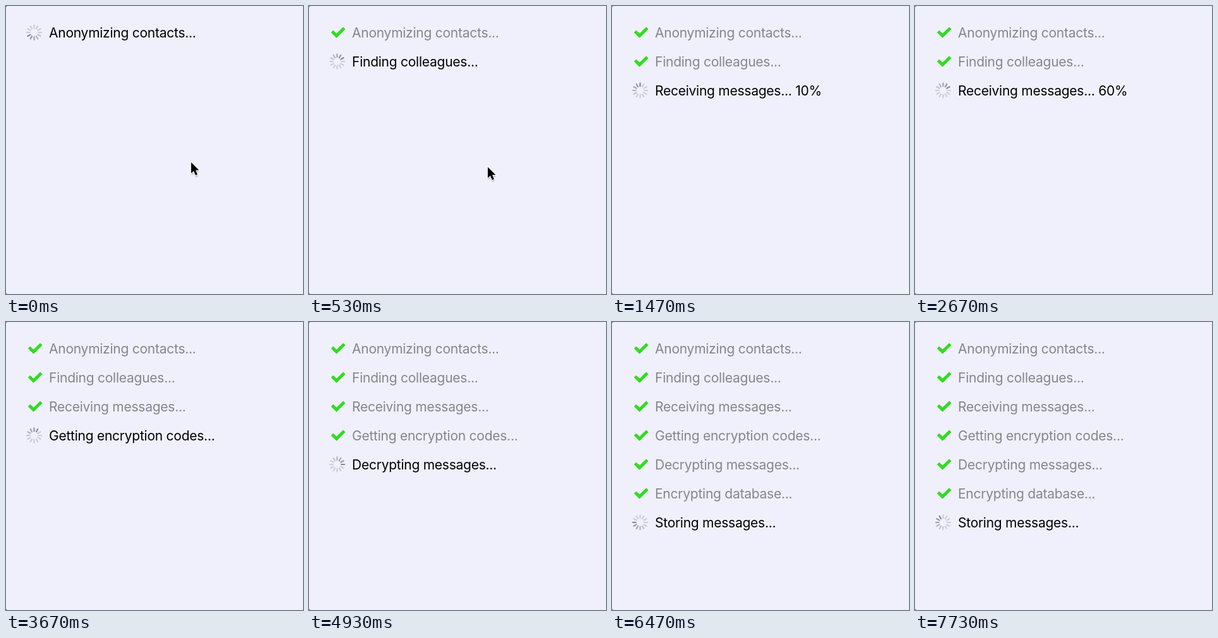
An HTML page that plays this animation: 470 by 457 pixels, repeating every 7.79 s.

```html
<!DOCTYPE html>
<html lang="en">
<head>
<meta charset="utf-8">
<title>Message sync progress</title>
<style>
  html, body { margin: 0; width: 100%; height: 100%; overflow: hidden; background: #f0f0fd; }
  svg { display: block; }
  text { font: 21px Inter, "Liberation Sans", sans-serif; letter-spacing: -0.25px; }
</style>
</head>
<body>
<svg id="stage" width="470" height="457" viewBox="0 0 470 457">
  <filter id="soft" x="-50%" y="-50%" width="200%" height="200%"><feGaussianBlur stdDeviation="1.2"/></filter>
  <rect width="470" height="457" fill="#f0f0fd"/>
  <path d="M0 0h2l-2 2zM0 457h2l-2-2z" fill="#77777c"/>
  <g id="rows"></g>
  <g id="spinner"></g>
  <g id="cursor">
    <path d="M0 2V20L4 16.3 7 23 10.5 21.5 7.6 15H13Z" fill="#000" opacity=".4" filter="url(#soft)"/>
    <path d="M0 0V17.5L4 13.8 7 20.6 10 19.3 7.1 12.6H12.4Z" fill="#000" stroke="#fff" stroke-width="2.2" paint-order="stroke"/>
  </g>
</svg>
<script>
const LOOP = 7790;
const FIRST_STEP = 370;
const STEP = 1000;
const ROW_TOP = 42;
const ROW_GAP = 46;
const BARS = 12;

const receiving = "Receiving messages...";
// Each entry is the moment, in steps, at which a row becomes active.
const tasks = [
  ["Anonymizing contacts...", -1],
  ["Finding colleagues...", 0],
  [receiving, 1],
  ["Getting encryption codes...", 3],
  ["Decrypting messages...", 4],
  ["Encrypting database...", 5],
  ["Storing messages...", 6],
].map(([label, step]) => ({ label, start: step < 0 ? 0 : FIRST_STEP + step * STEP }));

const cursorPath = [
  [0, 293, 248], [370, 291, 249], [530, 283, 255],
  [800, 255, 371], [930, 244, 410], [1000, 242, 410],
];

const byId = id => document.getElementById(id);

function add(parent, name, attributes) {
  const node = document.createElementNS("http://www.w3.org/2000/svg", name);
  for (const key in attributes) node.setAttribute(key, attributes[key]);
  return parent.appendChild(node);
}

const rows = tasks.map((task, i) => {
  const group = add(byId("rows"), "g", { transform: `translate(0 ${ROW_TOP + i * ROW_GAP})` });
  const check = add(group, "path", {
    d: "M15 255l47-47 130 130L450 80l47 47-305 305z",
    transform: "translate(35.7 -10.5) scale(.041)",
    fill: "#30dd20", stroke: "#30dd20", "stroke-width": 56, "stroke-linejoin": "round",
  });
  const text = add(group, "text", { x: 68, y: 8 });
  return { group, check, text };
});

const bars = Array.from({ length: BARS }, (_, i) => add(byId("spinner"), "line", {
  y1: -6.8, y2: -11.6, stroke: "#73737d", "stroke-width": 2.2, "stroke-linecap": "round",
  transform: `rotate(${i * 360 / BARS})`,
}));

function drawCursor(t) {
  const next = cursorPath.findIndex(point => point[0] > t);
  byId("cursor").setAttribute("visibility", next < 0 ? "hidden" : "visible");
  if (next < 0) return;
  const [t0, x0, y0] = cursorPath[next - 1];
  const [t1, x1, y1] = cursorPath[next];
  const k = (t - t0) / (t1 - t0);
  byId("cursor").setAttribute("transform", `translate(${x0 + (x1 - x0) * k} ${y0 + (y1 - y0) * k})`);
}

function draw(t) {
  const active = tasks.filter(task => task.start <= t).length - 1;
  rows.forEach(({ group, check, text }, i) => {
    const { label, start } = tasks[i];
    const percent = t < start + STEP ? " 10%" : " 60%";
    group.setAttribute("visibility", i <= active ? "visible" : "hidden");
    check.setAttribute("display", i < active ? "inline" : "none");
    text.setAttribute("fill", i < active ? "#85858c" : "#000");
    text.textContent = label + (label === receiving && i === active ? percent : "");
  });

  byId("spinner").setAttribute("transform", `translate(44.5 ${ROW_TOP + active * ROW_GAP})`);
  const head = Math.floor(8.02 + t * 0.01135);
  bars.forEach((bar, i) => {
    const age = (head - i + BARS * LOOP) % BARS;
    bar.setAttribute("opacity", Math.max(0.28, 0.85 - age * 0.12));
  });

  drawCursor(t);
}

const begin = performance.now();
function tick() {
  draw((performance.now() - begin) % LOOP);
  requestAnimationFrame(tick);
}
draw(0);
requestAnimationFrame(tick);
</script>
</body>
</html>
```
